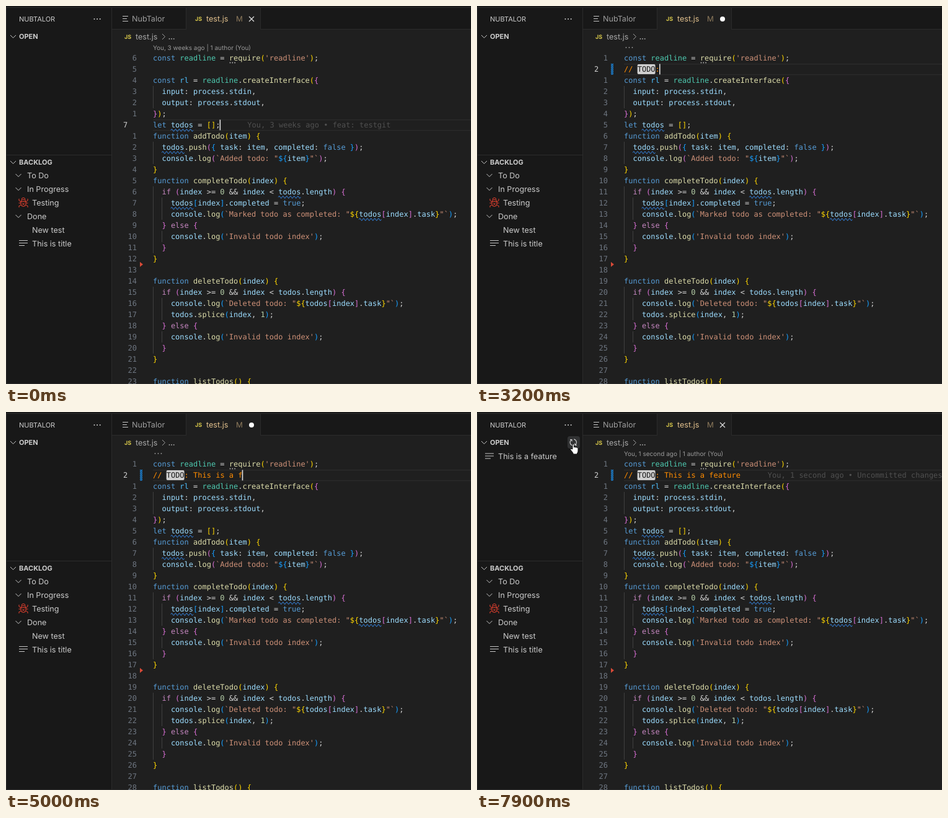
Animation, 750 px wide and 610 px high, one loop 8000 ms. Source, as an HTML page:

```html
<!DOCTYPE html>
<html lang="en">
<head>
<meta charset="utf-8">
<title>Editor todo demo</title>
<style>
  html, body { margin: 0; width: 100%; height: 100%; overflow: hidden; background: #1f1f1f; }
  svg { display: block; width: 750px; height: 610px; }
  text { white-space: pre; text-rendering: geometricPrecision; }
  .ui { font-family: Inter, "Open Sans", sans-serif; }
  .mono { font: 12px "DejaVu Sans Mono", monospace; }
</style>
</head>
<body>
<svg id="stage" viewBox="0 0 750 610"></svg>
<script>
const LOOP = 8000;
const LEFT = 237, CHAR = 7.224, ROW = 18, FIRST = 84;
const stage = document.getElementById('stage');
const rowY = i => FIRST + ROW * i;
const colX = c => LEFT + CHAR * c;

const SOURCE = `const readline = require('readline');

const rl = readline.createInterface({
  input: process.stdin,
  output: process.stdout,
});
let todos = [];
function addTodo(item) {
  todos.push({ task: item, completed: false });
  console.log(\`Added todo: "\${item}"\`);
}
function completeTodo(index) {
  if (index >= 0 && index < todos.length) {
    todos[index].completed = true;
    console.log(\`Marked todo as completed: "\${todos[index].task}"\`);
  } else {
    console.log('Invalid todo index');
  }
}

function deleteTodo(index) {
  if (index >= 0 && index < todos.length) {
    console.log(\`Deleted todo: "\${todos[index].task}"\`);
    todos.splice(index, 1);
  } else {
    console.log('Invalid todo index');
  }
}

function listTodos() {`.split('\n');

// ---- drawing helpers ----
function add(tag, attrs = {}, parent = stage) {
  const node = document.createElementNS('http://www.w3.org/2000/svg', tag);
  for (const k in attrs) node.setAttribute(k, attrs[k]);
  parent.append(node);
  return node;
}
const group = (parent = stage) => add('g', {}, parent);
const rect = (x, y, width, height, fill, parent, rx = 0) =>
  add('rect', { x, y, width, height, fill, rx }, parent);
const line = (d, stroke, parent, width = 1) =>
  add('path', { d, stroke, fill: 'none', 'stroke-width': width }, parent);

function label(x, cy, str, size, fill, parent, weight = 400) {
  const t = add('text', { class: 'ui', x, y: cy + size * 0.364, fill, 'font-size': size, 'font-weight': weight }, parent);
  t.textContent = str;
  return t;
}
function mono(x, cy, str, fill, parent, anchor = 'start') {
  const t = add('text', { class: 'mono', x, y: cy + 4, fill, 'text-anchor': anchor }, parent);
  t.textContent = str;
  return t;
}
const show = (node, on) => node.setAttribute('visibility', on ? 'visible' : 'hidden');
const move = (node, x, y) => node.setAttribute('transform', `translate(${x} ${y})`);

function dots(x, y, gap, r, fill, parent) {
  for (let i = 0; i < 3; i++) add('circle', { cx: x + i * gap, cy: y, r, fill }, parent);
}
const down = (x, y) => line(`M${x - 4.5} ${y - 2.5}l4.5 4.5 4.5-4.5`, '#c5c5c5');
const right = (x, y, fill, parent) => line(`M${x - 2.5} ${y - 4.5}l4.5 4.5-4.5 4.5`, fill, parent);
const listIcon = (x, y, parent) =>
  line(`M${x} ${y - 4.5}h14M${x} ${y - 0.5}h14M${x} ${y + 3.5}h9`, '#c5c5c5', parent);

// ---- syntax colours ----
const BRACKETS = ['#ffd700', '#da70d6', '#179fff'];
let depth = 0;

function bracket(ch) {
  if (/[)\]}]/.test(ch)) return BRACKETS[--depth % 3];
  return BRACKETS[depth++ % 3];
}
function wordColor(word, next) {
  if (/^(const|let|function|true|false)$/.test(word)) return '#569cd6';
  if (/^(if|else)$/.test(word)) return '#c586c0';
  if (/^\d/.test(word)) return '#b5cea8';
  if (next === '(') return '#dcdcaa';
  if (word === 'readline') return '#4ec9b0';
  if (word === 'rl') return '#4fc1ff';
  return '#9cdcfe';
}
function tokens(src) {
  const out = [];
  let pos = 0, quoted = false, inner = false;
  while (pos < src.length) {
    const re = quoted && !inner ? /\$\{|`|[^$`]+/y : /'[^']*'|\w+|\s+|[^\w\s]/y;
    re.lastIndex = pos;
    const s = re.exec(src)[0];
    let color = '#d4d4d4';
    if (s === '`') { quoted = !quoted; color = '#ce9178'; }
    else if (s === '${') { inner = true; color = bracket('{'); }
    else if (quoted && !inner || s[0] === "'") color = '#ce9178';
    else if (/^[()[\]{}]$/.test(s)) {
      color = bracket(s);
      if (s === '}') inner = false;
    } else if (/^\w/.test(s)) color = wordColor(s, src[pos + s.length]);
    out.push([pos, s, color]);
    pos += s.length;
  }
  return out;
}

// ---- window frame and tabs ----
rect(0, 0, 750, 610, '#1f1f1f');
rect(0, 0, 170, 610, '#181818');
rect(170, 0, 580, 38, '#181818');
rect(291, 3, 119, 36, '#1f1f1f');
const EDGE = '#2b2b2b';
[[0, 2, 750, 1], [0, 2, 1, 608], [170, 2, 1, 608], [290, 3, 1, 35], [410, 3, 1, 35],
 [171, 37, 120, 1], [410, 37, 340, 1], [0, 240, 170, 1], [0, 609, 750, 1]]
  .forEach(([x, y, w, h]) => rect(x, y, w, h, EDGE));

line('M188 16.5h9M188 20.5h7M188 24.5h9', '#c5c5c5');
label(203, 20.5, 'NubTalor', 12.6, '#9d9d9d');
label(305, 20.5, 'JS', 9, '#d8c84a', stage, 700);
label(323, 20.5, 'test.js', 12.6, '#e2c08d');
label(371, 20.5, 'M', 12, '#8f7b5d');
const closeMark = line('M392 17l8 8M400 17l-8 8', '#e0e0e0', stage, 1.2);
const unsaved = add('circle', { cx: 396, cy: 21, r: 4, fill: '#fff' });

label(191, 49.5, 'JS', 9, '#d8c84a', stage, 700);
label(209, 49.5, 'test.js', 12.6, '#a9a9a9');
right(254.5, 49.5, '#a0a0a0');
const crumbDots = group();
dots(263.5, 53, 3.6, 0.9, '#a9a9a9', crumbDots);
const crumbName = group();
line('M266 45h-2.5v9h2.5M274 45h2.5v9H274M267 51.5l3-4h3.5l-3 4z', '#75beff', crumbName);
label(281, 49.5, 'rl', 12.6, '#a9a9a9', crumbName);

// ---- sidebar ----
label(21, 21, 'NUBTALOR', 11, '#cccccc');
dots(142.5, 21, 4.6, 1, '#cccccc');
down(11.5, 49.5);
label(21, 49, 'OPEN', 11, '#cccccc', stage, 700);
down(11.5, 252.5);
label(21, 252, 'BACKLOG', 11, '#cccccc', stage, 700);
[[273, 'To Do'], [295, 'In Progress'], [339, 'Done']].forEach(([y, s]) => {
  down(20, y + 0.5);
  label(34, y, s, 12.6, '#cccccc');
});
[[317, 'Testing'], [361, 'New test'], [383, 'This is title']].forEach(([y, s]) => label(42, y, s, 12.6, '#cccccc'));
listIcon(21, 383);
line('M24 315.5a4 3 0 0 1 8 0zM24 316v3.5a4 4 0 0 0 8 0V316M25 312.5a3 3 0 0 1 6 0' +
     'M21 311v3l3 2M35 311v3l-3 2M20.5 318H24M32 318h3.5M24 321l-3 1.5v2.5M32 321l3 1.5v2.5M26 317.5l4 4M30 317.5l-4 4', '#e5402f');

const newItem = group();
listIcon(13, 71.5, newItem);
label(34, 71.5, 'This is a feature', 12.6, '#cccccc', newItem);

const refresh = group();
const refreshBg = rect(146, 39, 20, 20, '#313233', refresh, 4);
line('M152.5 44.6a5.3 5.3 0 0 0 1.5 9.5M158 53.5a5.3 5.3 0 0 0-1.6-9.6M150 44.5h3v3M161 53.5h-3.2v-3', '#d0d0d0', refresh, 1.1);

// ---- editor ----
const current = group();
rect(LEFT, -9, 513, 1.5, '#2a2a2a', current);
rect(LEFT, 8, 513, 1.5, '#2a2a2a', current);

const marks = group();
rect(colX(6), rowY(0) - 9, CHAR * 8, ROW, '#093d5b', marks);
rect(colX(11), rowY(2) - 9, CHAR * 8, ROW, '#4a4d4c', marks);

const numbers = SOURCE.map((src, i) => {
  const y = rowY(i);
  const indent = src.search(/\S/);
  for (let c = 0; c < indent; c += 2) rect(Math.round(colX(c)), y - 9, 1, ROW, '#404040');
  const t = mono(LEFT, y, '');
  for (const [pos, s, fill] of tokens(src)) add('tspan', { x: colX(pos), fill }, t).textContent = s;
  return mono(0, y, '', '#6e7681');
});

[6, 8, 12, 13, 14].forEach(i => {
  const x = colX(SOURCE[i].indexOf('todos'));
  line(`M${x} ${rowY(i) + 8.5}` + 'q1.5-3.4 3 0t3 0'.repeat(6), '#3794ff');
});
dots(361.5, 91.5, 3.8, 0.9, '#b8b8b8');
add('path', { d: 'M216 413l5 4-5 4z', fill: '#d84a38' });

const lens = label(LEFT, 67.5, '', 10, '#999999');
const lensDots = group();
dots(240.5, 67, 5, 0.9, '#999999', lensDots);

const changed = group();
const clip = add('clipPath', { id: 'bar' });
rect(216, 93, 4, 18, '#fff', clip);
changed.setAttribute('clip-path', 'url(#bar)');
for (let y = 92; y < 118; y += 3) line(`M215 ${y}l6-6`, '#1b88e0', changed, 1.5);

const todoBox = rect(colX(3), 94, CHAR * 4, 16, '#cfcfcf', stage, 2);
const comment = mono(LEFT, rowY(1), '');
const blame = mono(0, 0, '', '#505050');
const caret = rect(0, 0, 1.6, 17, '#e0e0e0');

// ---- suggestion list ----
const HINTS = ['This should', 'This should be', 'This is', 'This function', 'This should probably'];
const popup = group();
const popupBox = add('rect', { x: 316.5, y: 111.5, width: 431, fill: '#202020', stroke: '#454545' }, popup);
rect(317, 112, 430, 18, '#04395e', popup);
right(727.5, 121, '#d8d8d8', popup);
const hintRows = HINTS.map((_, i) => {
  const g = group(popup);
  move(g, 0, 121 + ROW * i);
  line('M321 4.5l6-6a3.6 3.6 0 0 1 4.5-4.5l-2.4 2.4 2 2 2.4-2.4a3.6 3.6 0 0 1-4.5 4.5l-6 6z', '#d0d0d0', g);
  line('M343 -3.5l3.4 1.8v3.6l-3.4 1.8-3.4-1.8v-3.6z', '#d0d0d0', g, 1.3);
  return { g, text: mono(354, 0, '', '#d4d4d4', g) };
});

// ---- pointers ----
const beam = group();
const beamPath = 'M-3.5-8.5q3 0 3.5 2 .5-2 3.5-2M-3.5 8.5q3 0 3.5-2 .5 2 3.5 2M0-6.5v13M-2 2h4';
line(beamPath, '#111', beam, 3);
line(beamPath, '#fff', beam, 1.3);
const hand = group();
add('path', {
  d: 'M-2 1v-7.5q1.4-1.8 2.6 0V-2q1.3-1.4 2.4.2 1.4-1 2.2.5 1.4-.6 1.8.9V4q0 2-1.5 3.5V9H-1V7.5Q-2.5 5-5.5 1.5-4.5-.8-2 1z',
  fill: '#fff', stroke: '#111', 'stroke-width': 1, 'stroke-linejoin': 'round'
}, hand);

// ---- timing ----
const COMMENT = '// TODO: This is a feature';
const RUNS = [[1900, 110, 3], [2450, 140, 5], [3250, 170, 3], [3950, 130, 9], [5130, 130, 6]];
const KEYS = RUNS.flatMap(([start, step, n]) => Array.from({ length: n }, (_, i) => start + step * i));
const CLICK = 700, UP = 1500, SAVE = 6300, BLAME = 7100, REFRESH = 7600, LISTED = 7750;
const WAKES = [0, CLICK, UP, ...KEYS];

// Pointer stops: time, x, y
const BEAM_PATH = [[100, 708, 390], [650, 358, 114], [1250, 358, 114], [1450, 330, 103], [1850, 330, 103]];
const HAND_PATH = [[7150, 590, 430], [7550, 156, 59], [8000, 156, 59]];

function along(path, t) {
  if (t < path[0][0] || t >= path[path.length - 1][0]) return null;
  const i = path.findIndex(p => p[0] > t);
  const [a, b] = [path[i - 1], path[i]];
  const k = (t - a[0]) / (b[0] - a[0]);
  const e = k * k * (3 - 2 * k);
  return [a[1] + (b[1] - a[1]) * e, a[2] + (b[2] - a[2]) * e];
}

function drawNumbers(row) {
  numbers.forEach((n, i) => {
    const here = i === row;
    n.textContent = here ? row + 1 : Math.abs(i - row);
    n.setAttribute('x', here ? 189 : 211);
    n.setAttribute('text-anchor', here ? 'start' : 'end');
    n.setAttribute('fill', here ? '#d0d0d0' : '#6e7681');
  });
}

function drawComment(typed) {
  const found = typed.includes('TODO');
  comment.textContent = '';
  const put = (s, fill) => add('tspan', { fill }, comment).textContent = s;
  if (found) {
    put('// ', '#ff8c00');
    put('TODO', '#1a1a1a');
    put(typed.slice(7), '#ff8c00');
  } else put(typed, '#6a9955');
  show(todoBox, found);
}

function drawHints(typed) {
  const word = typed.slice(9);
  const hits = word ? HINTS.filter(h => h.startsWith(word)) : [];
  show(popup, hits.length > 0);
  popupBox.setAttribute('height', hits.length * ROW + 3);
  hintRows.forEach(({ g, text }, i) => {
    g.setAttribute('display', i < hits.length ? 'inline' : 'none');
    if (i >= hits.length) return;
    text.textContent = '';
    add('tspan', { fill: '#2aaaff', 'font-weight': 700 }, text).textContent = word;
    add('tspan', { fill: i ? '#d4d4d4' : '#fff' }, text).textContent = hits[i].slice(word.length);
  });
}

function drawBlame(t, row) {
  const old = t < CLICK || t >= 1150 && t < UP;
  const fresh = t >= BLAME;
  show(blame, old || fresh);
  const cols = row === 1 ? COMMENT.length : SOURCE[row].length;
  blame.setAttribute('x', colX(cols) + 44);
  blame.setAttribute('y', rowY(row) + 4);
  blame.textContent = fresh ? 'You, 1 second ago • Uncommitted changes' : 'You, 3 weeks ago • feat: testgit';
}

let lastRow, lastTyped;
function draw(t) {
  const row = t < CLICK ? 6 : t < UP ? 2 : 1;
  const typed = COMMENT.slice(0, KEYS.filter(k => k <= t).length);
  if (row !== lastRow) drawNumbers(lastRow = row);
  if (typed !== lastTyped) {
    lastTyped = typed;
    drawComment(typed);
    drawHints(typed);
  }
  move(current, 0, rowY(row));
  drawBlame(t, row);

  const col = row === 6 ? 15 : row === 2 ? 16 : typed.length;
  const wake = Math.max(...WAKES.filter(w => w <= t));
  caret.setAttribute('x', colX(col) - 0.8);
  caret.setAttribute('y', rowY(row) - 8.5);
  show(caret, (t - wake) % 1000 < 500 && t < REFRESH);

  show(marks, t >= 950 && t < UP);
  show(crumbName, row === 2);
  show(crumbDots, row !== 2);

  const dirty = t >= KEYS[0] && t < SAVE;
  show(unsaved, dirty);
  show(closeMark, !dirty);
  show(changed, t >= 2900);

  const folded = t >= 2800 && t < BLAME;
  lens.textContent = `You, ${t < BLAME ? '3 weeks' : '1 second'} ago | 1 author (You)`;
  show(lens, !folded);
  show(lensDots, folded);

  const p = along(BEAM_PATH, t) || along(HAND_PATH, t);
  const inSide = !!p && p[0] < 171;
  show(beam, !!p && !inSide);
  show(hand, inSide);
  if (p) move(inSide ? hand : beam, ...p);
  show(refresh, inSide);
  show(refreshBg, inSide && p[0] < 166);
  show(newItem, t >= LISTED);
}

const begin = performance.now();
function tick() {
  draw((performance.now() - begin) % LOOP);
  requestAnimationFrame(tick);
}
tick();
</script>
</body>
</html>
```
